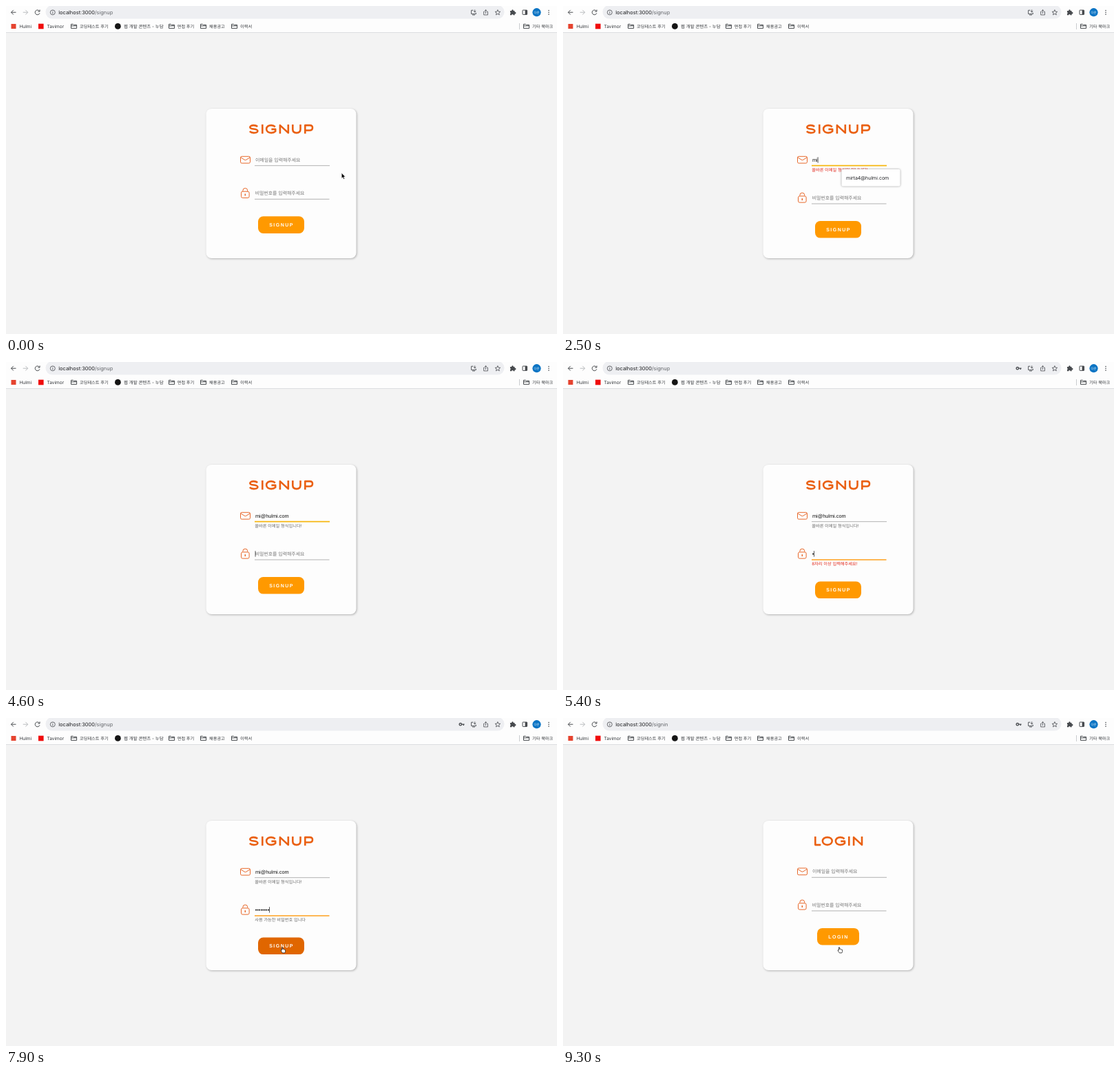
Animation, 800 px wide and 476 px high, one loop 9600 ms. Source, as an HTML page:

```html
<!DOCTYPE html>
<html lang="ko">
<head>
<meta charset="utf-8">
<title>Signup</title>
<style>
html, body { margin: 0; width: 100%; height: 100%; overflow: hidden; background: #f3f3f3; }
svg { display: block; width: 800px; height: 476px; }
text { font-family: Inter, 'Noto Sans CJK KR', 'Noto Sans CJK', sans-serif; text-rendering: geometricPrecision; white-space: pre; }
.line { fill: none; stroke: #474a4e; stroke-width: 1; }
.mark text { font-size: 6.2px; fill: #33363a; }
.mark .latin { font-size: 6.55px; }
.url { font-size: 7.45px; fill: #202124; }
.hint { font-size: 6.9px; fill: #757575; }
.value { font: 7.33px 'Liberation Sans', Arial, sans-serif; fill: #111; }
.note { font-size: 6.22px; fill: #6a6a6a; }
.note.bad { fill: #e0261b; }
.title { fill: none; stroke: #ea6012; stroke-width: 2.6; stroke-linejoin: round; }
.icon { fill: none; stroke: #e8682a; stroke-width: 1; stroke-linejoin: round; }
.label { font: bold 7px 'Liberation Sans', Arial, sans-serif; letter-spacing: 1.5px; fill: #fff; }
.card { fill: #fdfdfd; filter: drop-shadow(1.2px 1.4px 1.5px #0004); }
.float { fill: #fff; filter: drop-shadow(0 .8px 1.4px #0006); }
.dialog { fill: #fff; filter: drop-shadow(0 2px 5px #0006); }
</style>
</head>
<body>
<svg viewBox="0 0 800 476" xmlns="http://www.w3.org/2000/svg">
  <defs>
    <g id="folder" class="line" stroke-width=".9">
      <path d="M.5 6.6V.6H3.4L4.4 1.6H8.6V6.6ZM.5 3H8.6"/>
    </g>
  </defs>
  <rect width="800" height="476" fill="#f3f3f3"/>

  <rect width="800" height="38" fill="#fdfdfd"/>
  <path d="M0 38.5H800" stroke="#dcdde0"/>
  <rect x="57.500" y="-1" width="666" height="19.500" rx="9.750" fill="#eeeff2"/>
  <g class="line">
    <path d="M14.500 9.200H7.500M10.800 5.900L7.500 9.200L10.800 12.500"/>
    <path d="M24.700 9.200H31.700M28.400 5.900L31.700 9.200L28.400 12.500" stroke="#b9bbbe"/>
    <path d="M48.600 7.600A3.400 3.400 0 1 0 48.900 10.300M49 5.400V8H46.400"/>
    <circle cx="67.800" cy="9.300" r="3.500" stroke-width=".8"/>
    <path d="M67.800 8.900V11.200M67.800 7.100V7.900" stroke-width=".9"/>
    <path d="M678.500 6.200H675.600V11.500H682.400V9.800M677 13H681M680.700 5.400V9M679.100 7.500L680.700 9.100L682.300 7.500" stroke-width=".9"/>
    <path d="M695 8.200H693.700V12.900H699.500V8.200H698.200M696.600 11V5.600M694.900 7.200L696.600 5.500L698.300 7.200" stroke-width=".8"/>
    <path d="M713.900 5.500L715 8.100L717.700 8.300L715.600 10.100L716.300 12.800L713.900 11.400L711.500 12.800L712.200 10.100L710.100 8.300L712.800 8.100Z" stroke-width=".8"/>
    <rect x="750" y="6" width="6.600" height="6.400" rx=".6"/>
  </g>
  <g fill="#474a4e">
    <path d="M732 7H734.200A1.300 1.300 0 1 1 736.700 7H738.600V8.900A1.300 1.300 0 1 1 738.600 11.300V13.200H736.600A1.200 1.200 0 0 0 734.200 13.200H732V11.100A1.200 1.200 0 0 0 732 8.900Z"/>
    <path d="M753.600 6H756.600V12.400H753.600Z"/>
    <circle cx="788" cy="6.500" r=".8"/><circle cx="788" cy="9.300" r=".8"/><circle cx="788" cy="12.100" r=".8"/>
  </g>
  <g id="key">
    <circle cx="659.800" cy="9.200" r="1.700" fill="none" stroke="#474a4e" stroke-width="1.300"/>
    <path d="M661.500 9.200H665.600M664.300 9V11" fill="none" stroke="#474a4e" stroke-width="1.300"/>
  </g>
  <circle cx="770.500" cy="9.200" r="6.100" fill="#0b74c4"/>
  <text x="770.500" y="10.900" font-size="4.300" fill="#fff" text-anchor="middle">다온</text>
  <text class="url" x="76.300" y="12">localhost:3000<tspan id="path" fill="#63666a"></tspan></text>

  <g class="mark">
    <rect x="7.500" y="26" width="7" height="7" fill="#e5432f"/>
    <text class="latin" x="19.500" y="31.800">Hulmi</text>
    <rect x="47" y="25.700" width="7.600" height="7.600" fill="#f00b0b"/>
    <text class="latin" x="59.500" y="31.800">Tavimor</text>
    <use href="#folder" x="94" y="25.800"/><text x="107" y="31.700">코딩테스트 후기</text>
    <circle cx="162.400" cy="29.400" r="4.400" fill="#151515"/>
    <text x="171" y="31.700" style="font-size:6.450px">웹 개발 콘텐츠 - 누담</text>
    <use href="#folder" x="236" y="25.800"/><text x="248.700" y="31.700">면접 후기</text>
    <use href="#folder" x="282" y="25.800"/><text x="295" y="31.700">채용공고</text>
    <use href="#folder" x="327" y="25.800"/><text x="340" y="31.700">이력서</text>
    <path d="M745.500 25V34" stroke="#c9cbce"/>
    <use href="#folder" x="751" y="25.800"/><text x="764" y="31.700">기타 북마크</text>
  </g>

  <rect class="card" x="290.500" y="149" width="218" height="217" rx="8"/>
  <g id="title" class="title"></g>

  <g id="mailRow">
    <g class="icon">
      <rect x="340.500" y="218.300" width="14" height="9.800" rx="1.800"/>
      <path d="M341 219.800L346 223.100Q347.500 224 349 223.100L354 219.800"/>
    </g>
    <text id="mailHint" class="hint" x="362" y="225.500">이메일을 입력해주세요</text>
    <text id="mail" class="value" x="362" y="225.900"></text>
    <path id="mailLine" d="M361 231.700H470"/>
  </g>
  <text id="mailNote" class="note" x="361.200" y="240.200"></text>

  <g id="passRow">
    <g class="icon">
      <rect x="341.500" y="269.200" width="11.600" height="9.200" rx="2"/>
      <path d="M343.900 269V267.800A3.400 3.400 0 0 1 350.700 267.800V269"/>
      <path d="M347.300 272.400V275.400" stroke-width="1.500"/>
    </g>
    <text id="passHint" class="hint" x="361.700" y="274">비밀번호를 입력해주세요</text>
    <text id="pass" class="value" x="361.700" y="274.400"></text>
    <path id="passLine" d="M361 280.300H469.500"/>
  </g>
  <text id="passNote" class="note" x="361.200" y="295.200"></text>
  <rect id="caret" width=".7" height="8.400" fill="#111"/>

  <g id="button">
    <rect id="pill" y="305.300" height="24.600" rx="7.500"/>
    <text id="label" class="label" y="320.200"></text>
  </g>

  <g id="popup">
    <rect class="float" x="404.500" y="237" width="85" height="24.500" rx="2"/>
    <text x="411" y="251.600" font-size="7" fill="#202124">mirta4@hulmi.com</text>
  </g>

  <g id="alert">
    <rect class="dialog" x="277.500" y="19" width="244" height="71" rx="3.500"/>
    <text x="286" y="36.600" font-size="7.900" fill="#202124">localhost:3000 내용:</text>
    <text x="286" y="52.100" font-size="6.700" font-weight="500" fill="#202124">회원가입 성공!</text>
    <rect x="478" y="64" width="34.800" height="17" rx="2" fill="#1a66df"/>
    <text x="495.400" y="74.700" font-size="6.300" font-weight="700" fill="#fff" text-anchor="middle">확인</text>
  </g>

  <g id="pointer">
    <path id="arrow" d="M0 0V7.900L1.800 6.300L3 9L4.400 8.400L3.200 5.700H5.500Z" fill="#000" stroke="#fff" stroke-width=".6"/>
    <path id="beam" d="M-1.500-4Q0-4 0-3V3Q0 4-1.500 4M1.500-4Q0-4 0-3M0 3Q0 4 1.500 4" fill="none" stroke="#222" stroke-width=".8"/>
    <path id="hand" d="M-.7.700Q0-.2.700.700V3.200Q1.500 2.600 2.100 3.400Q2.900 2.900 3.400 3.800Q4.600 3.500 4.600 4.800V6.200Q4.500 7.600 3.800 8.600H.4Q-.6 7.300-1.700 5.600Q-2.300 4.600-1.500 4.300Q-1.100 4.200-.7 4.900Z" fill="#fff" stroke="#111" stroke-width=".75" stroke-linejoin="round"/>
  </g>
</svg>
<script>
const LOOP = 9600;
const MAIL = 'mi@hulmi.com';
const MAIL_KEYS = [1100, 2400, 2600, 3000, 3300, 3400, 3500, 3700, 3900, 4000, 4100, 4300];
const PASS_KEYS = [5400, 5600, 5800, 6000, 6200, 6400, 6600, 6900];
const AT = { mailFocus: 700, popup: 800, mailOk: 4100, passFocus: 4600, hover: 7500, alert: 8200, close: 9000, login: 9100 };

const GLYPHS = {
  S: 'M12.2 1.900C10.500.4 8.600 0 6.600 0C3.600 0 1.300 1 1.300 2.900C1.300 4.700 3.600 5 6.600 5.400S12.400 6.200 12.400 8.200S9.800 11 6.800 11C4.200 11 2.300 10.300.8 8.800',
  I: 'M1.300-1.200V12.200',
  G: 'M14 2.200C12.600.7 10.600 0 8.200 0C4 0 1.300 2.200 1.300 5.500S4 11 8.200 11C10.900 11 13 10.200 14.400 8.800V5.800H8.600',
  N: 'M1.300 12.200V0L13.200 11V-1.200',
  U: 'M1.300-1.200V6C1.300 9.300 3.300 11 6.900 11S12.500 9.300 12.500 6V-1.200',
  P: 'M1.300 12.200V0H8C10.600 0 12 1.400 12 3.700S10.600 7.400 8 7.400H1.300',
  L: 'M1.300-1.200V11H9.300',
  O: 'M8 0C12 0 14.900 2.200 14.900 5.500S12 11 8 11S1.100 8.800 1.100 5.500S4 0 8 0Z'
};

const ui = {};
document.querySelectorAll('[id]').forEach(el => ui[el.id] = el);
const set = (el, attrs) => { for (const k in attrs) el.setAttribute(k, attrs[k]); };
const show = (el, on) => { el.style.display = on ? '' : 'none'; };
const say = (el, s) => { if (el.textContent !== s) el.textContent = s; };
const shift = (el, y) => set(el, { transform: `translate(0 ${y})` });
const count = (keys, t) => keys.filter(k => k <= t).length;
const ramp = (t, start, span) => Math.max(0, Math.min(1, (t - start) / span));
const ease = p => p * p * (3 - 2 * p);
const mix = (a, b, p) => a + (b - a) * p;
const blend = (a, b, p) => `rgb(${a.map((v, i) => Math.round(mix(v, b[i], p)))})`;

const GRAY = [170, 170, 170], GOLD = [246, 183, 16], ORANGE = [255, 160, 30], TAN = [222, 176, 84];

function wordmark(word, xs) {
  set(ui.title, { role: 'img', 'aria-label': word });
  ui.title.innerHTML = [...word].map((c, i) =>
    `<path transform="translate(${xs[i]} 173.100)" d="${GLYPHS[c]}"/>`).join('');
}

function underline(el, color, p) {
  set(el, { stroke: blend(GRAY, color, p), 'stroke-width': 0.9 + p * 0.8 });
}

let page;
function setPage(login) {
  if (page === login) return;
  page = login;
  if (login) wordmark('LOGIN', [365, 375.8, 394.6, 414, 420.8]);
  else wordmark('SIGNUP', [353, 371, 376.8, 396.6, 415, 433]);
  say(ui.path, login ? '/signin' : '/signup');
  say(ui.label, login ? 'LOGIN' : 'SIGNUP');
  set(ui.label, { x: login ? 385.2 : 382.2 });
  set(ui.pill, { x: login ? 369 : 366, width: login ? 61 : 67 });
}

function drawNote(el, s, bad) {
  say(el, s);
  el.classList.toggle('bad', bad);
}

function drawCaret(t, box, x, y, since) {
  show(ui.caret, (t - since) % 1000 < 500);
  set(ui.caret, { x: x + box.getComputedTextLength(), y });
}

function drawPointer(t) {
  const go = ease(ramp(t, 200, 450)), back = ease(ramp(t, 7100, 500));
  const late = t >= 7100;
  const x = late ? mix(404, 401, back) : mix(487.2, 404, go);
  const y = late ? mix(224, 332.3, back) : mix(242.3, 224, go);
  const inField = x < 470 && (y > 217 && y < 232 || late && y > 272 && y < 287);
  const isHand = t >= AT.hover && t < AT.alert || t >= AT.login;
  show(ui.pointer, t < MAIL_KEYS[0] || late);
  show(ui.hand, isHand);
  show(ui.beam, inField && !isHand);
  show(ui.arrow, !inField && !isHand);
  set(ui.pointer, { transform: `translate(${x} ${y})` });
}

function draw(t) {
  const login = t >= AT.login;
  const m = login ? 0 : count(MAIL_KEYS, t), p = login ? 0 : count(PASS_KEYS, t);
  const drop = (m > 0) * 6.7, drop2 = drop + (p > 0) * 6.5, lift = login ? -0.4 : 0;
  const alertOn = t >= AT.alert && t < AT.close;
  setPage(login);

  say(ui.mail, MAIL.slice(0, m));
  say(ui.pass, '•'.repeat(p));
  show(ui.mailHint, !m);
  show(ui.passHint, !p);
  shift(ui.mailRow, lift);
  shift(ui.passRow, drop + lift);
  shift(ui.button, drop2 + lift);

  const mailOk = t >= AT.mailOk, passOk = p === PASS_KEYS.length;
  drawNote(ui.mailNote, !m ? '' : mailOk ? '올바른 이메일 형식입니다!' : '올바른 이메일 형식이 아닙니다!', !mailOk);
  drawNote(ui.passNote, !p ? '' : passOk ? '사용 가능한 비밀번호 입니다' : '8자리 이상 입력해주세요!', !passOk);

  const mailLit = ramp(t, AT.mailFocus, 200) * (1 - ramp(t, AT.passFocus, 200));
  underline(ui.mailLine, GOLD, mailLit);
  underline(ui.passLine, ORANGE, login ? 0 : ramp(t, AT.passFocus, 200));
  if (t >= AT.alert && !login) set(ui.passLine, { stroke: blend(TAN, TAN, 0), 'stroke-width': 1 });

  if (t < AT.mailFocus || t >= AT.alert) show(ui.caret, false);
  else if (t < AT.passFocus) drawCaret(t, ui.mail, 362, 219.3, m ? MAIL_KEYS[m - 1] : AT.mailFocus);
  else drawCaret(t, ui.pass, 361.7, 274.2, p ? PASS_KEYS[p - 1] : AT.passFocus);

  const hot = login ? 0 : ramp(t, AT.hover, 200);
  set(ui.pill, { fill: blend([255, 153, 0], [224, 102, 0], hot) });
  show(ui.key, t >= PASS_KEYS[0]);
  show(ui.popup, t >= AT.popup && t < MAIL_KEYS[2]);
  show(ui.alert, alertOn);
  drawPointer(t);
}

const start = performance.now();
function tick() {
  draw((performance.now() - start) % LOOP);
  requestAnimationFrame(tick);
}
tick();
</script>
</body>
</html>
```
